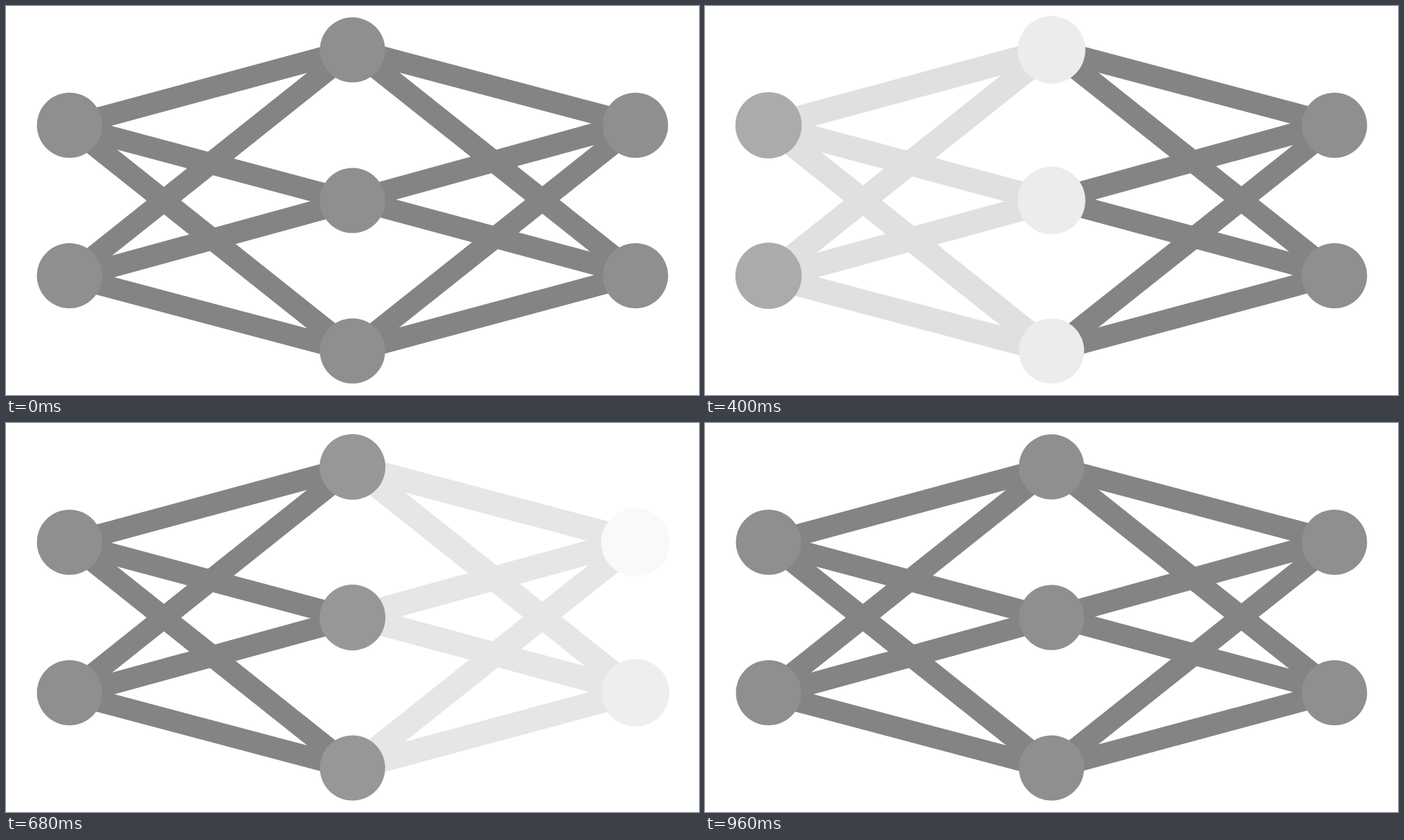
Recreate the animation shown at these times as an HTML page. Size 998 by 561 pixels, loop 1040 ms.

```html
<!DOCTYPE html>
<html lang="en">
<head>
<meta charset="utf-8">
<title>Network pulse</title>
<style>
  html, body { margin: 0; width: 100%; height: 100%; overflow: hidden; background: #fff; }
  svg { display: block; width: 100%; height: 100%; }
</style>
</head>
<body>
<svg id="net" viewBox="0 0 998 561"></svg>
<script>
const LOOP = 1040, STEP = 40, LAST = 960;
const NODE = [142, 144, 143], LINK = [132, 132, 132];
const svg = document.getElementById('net');

function add(tag, attrs, parent = svg) {
  const el = document.createElementNS('http://www.w3.org/2000/svg', tag);
  for (const k in attrs) el.setAttribute(k, attrs[k]);
  parent.appendChild(el);
  return el;
}

// Links between two columns; each pair holds the start and end heights.
function links(x1, x2, pairs, timing) {
  const g = add('g');
  for (const [y1, y2] of pairs) add('line', { x1, y1, x2, y2 }, g);
  return { el: g, timing };
}

function node(cx, cy, timing, fixed = false) {
  return { el: add('circle', { cx, cy, r: 47 }), timing, fixed };
}

const pulse = (start, peak, end, bias = 0.77, top = 1) => ({ start, peak, end, bias, top });
const inTime = pulse(0, 240, 480);
const midTime = pulse(240, 480, 720);

const wires = [
  links(91.5, 499, [
    [173, 62.7], [172.8, 281.8], [172.3, 497.2],
    [389, 64], [392.8, 281], [390, 498.3]
  ], pulse(80, 320, 560)),
  links(499, 906.5, [
    [62.2, 170.3], [62, 386.5], [280.3, 168],
    [278.3, 388], [497.4, 173], [497.8, 388]
  ], pulse(420, 560, 960))
];

const nodes = [
  node(91.5, 172, inTime),
  node(91.5, 389, inTime),
  node(499, 63.3, midTime),
  node(499, 280.5, midTime),
  node(499, 497.5, midTime, true),
  node(906.5, 172, pulse(480, 720, 960, 0.7, 0.98)),
  node(906.5, 389, pulse(480, 720, 960, 0.9, 0.9))
];

const ease = p => (1 - Math.cos(Math.PI * Math.min(1, Math.max(0, p)))) / 2;

// 0 = full grey, 1 = white
function fade({ start, peak, end, bias, top }, t) {
  if (t <= start || t >= end) return 0;
  const rise = Math.pow((t - start) / (peak - start), bias);
  return top * (t < peak ? ease(rise) : ease((end - t) / (end - peak)));
}

const tint = (rgb, w) => `rgb(${rgb.map(c => Math.round(c + (255 - c) * w)).join(',')})`;

function draw(t) {
  for (const { el, timing } of wires) {
    const w = fade(timing, t);
    el.setAttribute('stroke', tint(LINK, w));
    el.setAttribute('stroke-width', 31 + 4.2 * Math.pow(w, 0.7));
  }
  for (const { el, timing, fixed } of nodes) {
    const w = fade(timing, t);
    el.setAttribute('fill', tint(NODE, w));
    if (!fixed) el.setAttribute('r', 47 + 1.6 * Math.sqrt(w) + 1.2 * Math.pow(w, 8));
  }
}

function tick() {
  const t = performance.now() % LOOP;
  draw(Math.min(LAST, Math.floor(t / STEP) * STEP));
  requestAnimationFrame(tick);
}
tick();
</script>
</body>
</html>
```
